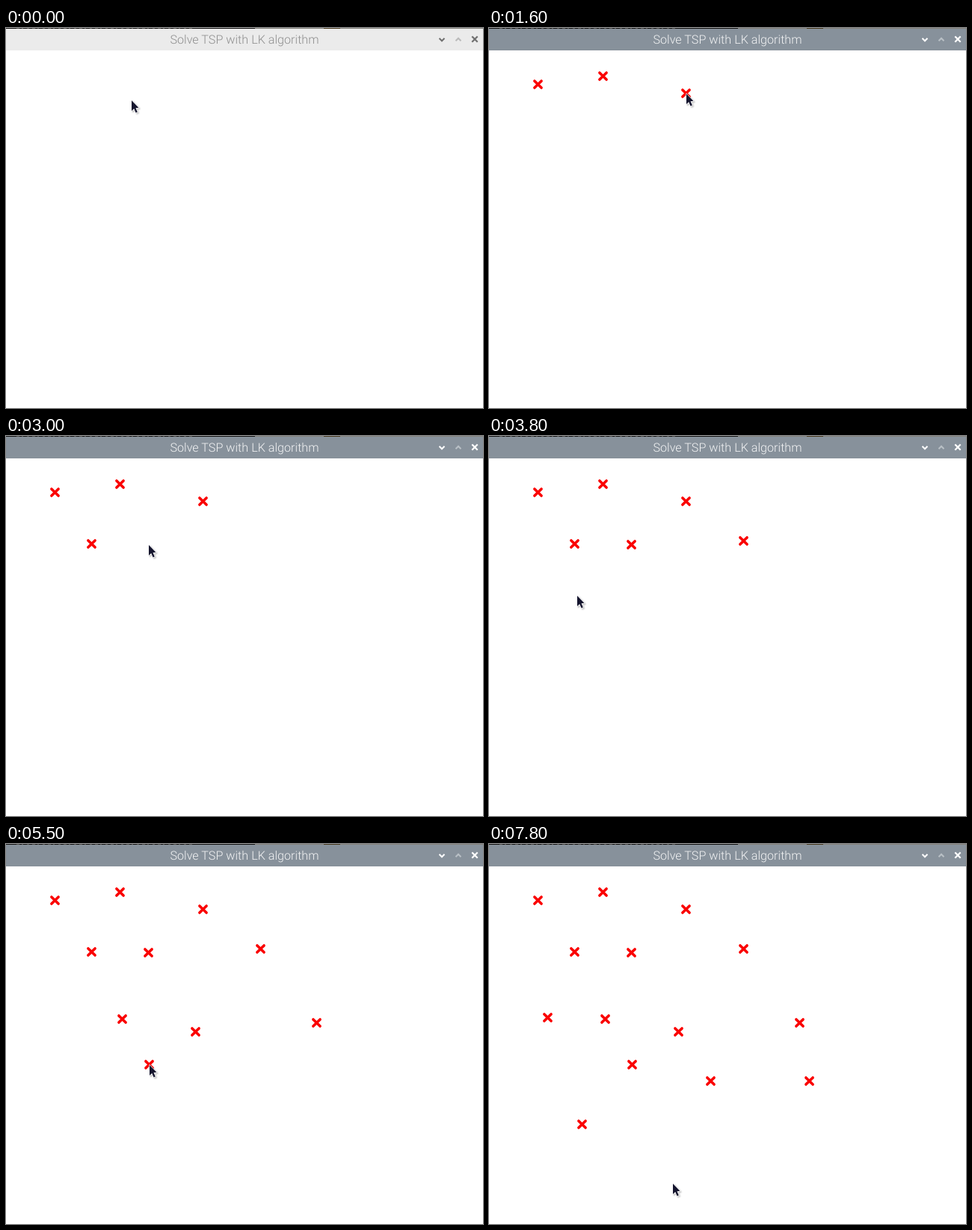
An HTML page with a canvas that plays this animation: 638x509 px, repeating every 8000 ms.

```html
<!DOCTYPE html>
<html lang="en">
<head>
<meta charset="utf-8">
<title>Solve TSP with LK algorithm</title>
<style>
  html, body { margin: 0; width: 100%; height: 100%; overflow: hidden; background: #fff; }
  canvas { display: block; }
</style>
</head>
<body>
<canvas id="stage" width="638" height="509"></canvas>
<script>
const ctx = document.getElementById('stage').getContext('2d');
const W = 638, H = 509, LOOP = 8000, STEP = 100;
const LEAD = 200; // the pointer reaches a city this long before the click

const city = (at, x, y) => ({ at, arrive: at - LEAD, x: x + 1, y: y + 1, isCity: true });
const turn = (at, x, y) => ({ at, arrive: at, x, y });

const route = [
  turn(0, 168, 97), turn(300, 71, 42), turn(500, 66, 75),
  city(900, 65, 75), city(1300, 152, 64), city(1600, 263, 87),
  turn(2200, 377, 129), turn(2400, 364, 110),
  city(2900, 114, 144), city(3200, 190, 145), city(3500, 340, 140),
  turn(3600, 308, 165), turn(3800, 118, 214),
  city(4200, 155, 234), city(4500, 253, 251), city(4800, 415, 239),
  city(5400, 191, 295), city(5800, 296, 317), city(6200, 428, 317),
  turn(6500, 106, 380), turn(6700, 85, 326),
  city(7100, 78, 232), city(7700, 124, 375), turn(7800, 246, 455)
];
const cities = route.filter(stop => stop.isCity);

const ease = p => p * p * (3 - 2 * p);
const clamp = p => Math.min(1, Math.max(0, p));

// Rest one step at each stop, then glide so as to arrive on time
function pointerAt(t) {
  const i = route.findIndex(stop => stop.at > t);
  if (i < 0) return route[route.length - 1];
  const from = route[i - 1], to = route[i];
  const leave = Math.min(from.at + STEP, to.arrive - STEP);
  const p = ease(clamp((t - leave) / (to.arrive - leave)));
  return {
    x: Math.round(from.x + (to.x - from.x) * p),
    y: Math.round(from.y + (to.y - from.y) * p)
  };
}

function trace(points) {
  ctx.beginPath();
  points.forEach(([x, y]) => ctx.lineTo(x, y));
}

function line(points, color, width) {
  trace(points);
  ctx.strokeStyle = color;
  ctx.lineWidth = width;
  ctx.stroke();
}

function cross(x, y, r, color, width) {
  line([[x - r, y - r], [x + r, y + r]], color, width);
  line([[x - r, y + r], [x + r, y - r]], color, width);
}

function chevron(x, y, dir, color) {
  line([[x - 3.5, y - 1.75 * dir], [x, y + 1.75 * dir], [x + 3.5, y - 1.75 * dir]], color, 2);
}

function bar(x, y, w, h, color) {
  ctx.fillStyle = color;
  ctx.fillRect(x, y, w, h);
}

// Sliver of the desktop above the window
function drawDesktop() {
  bar(0, 0, W, 1, '#85837d');
  bar(0, 0, 333, 1, '#141312');
  bar(425, 0, 22, 1, '#4a3a1e');
  for (let x = 14; x < 250; x += 7) bar(x, 0, 2 + x % 3, 1, '#4c4a47');
}

function drawTitle(active) {
  bar(0, 0, W, 30, active ? '#87919b' : '#ebebeb');
  drawDesktop();
  ctx.fillStyle = active ? '#f2f3f4' : '#8f8f8f';
  ctx.font = '300 16.16px Roboto, sans-serif';
  ctx.textRendering = 'geometricPrecision';
  ctx.textAlign = 'center';
  ctx.fillText('Solve TSP with LK algorithm', 319, 21);
  const icon = active ? '#ffffff' : '#707070';
  ctx.lineCap = 'butt';
  chevron(583, 15.5, 1, icon);
  chevron(605, 15.5, -1, active ? '#b9c0c6' : '#bababa');
  cross(627, 15, 3.7, icon, 2.2);
}

const arrow = [[0, 0], [0, 14], [3.2, 11], [5.6, 16.4], [7.8, 15.4], [5.5, 10.2], [9.4, 9.8], [0, 0]];

function drawPointer({ x, y }) {
  ctx.save();
  ctx.translate(x, y);
  ctx.lineJoin = 'round';
  ctx.shadowColor = 'rgba(0, 0, 0, 0.3)';
  ctx.shadowBlur = 2;
  ctx.shadowOffsetX = ctx.shadowOffsetY = 1.5;
  line(arrow, '#ffffff', 1.2);
  ctx.shadowColor = 'transparent';
  ctx.fillStyle = '#15152e';
  ctx.fill();
  ctx.restore();
}

function draw(t) {
  bar(0, 0, W, H, '#ffffff');
  drawTitle(t >= cities[0].at);
  ctx.lineCap = 'round';
  for (const { at, x, y } of cities) {
    if (t >= at) cross(x - 0.5, y - 0.5, 4.6, '#fa0000', 3.6);
  }
  drawPointer(pointerAt(t));
}

const begin = performance.now();
function tick() {
  const t = (performance.now() - begin) % LOOP;
  draw(Math.floor(t / STEP) * STEP);
  requestAnimationFrame(tick);
}
tick();
</script>
</body>
</html>
```
